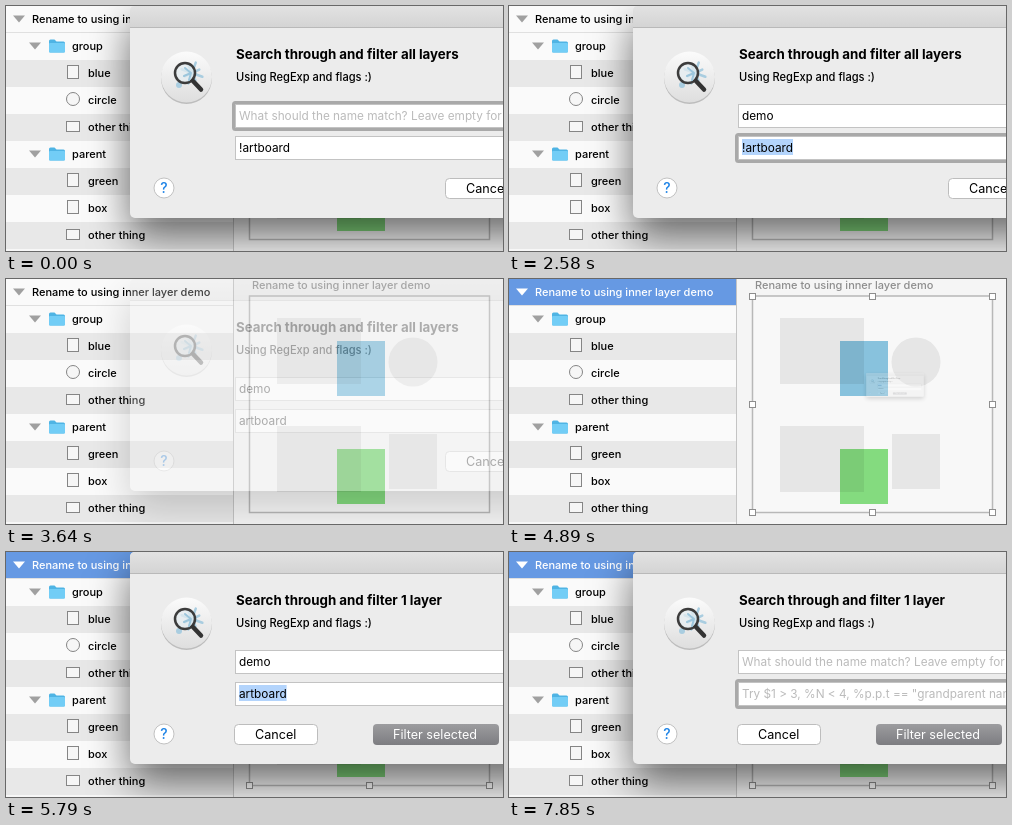
An HTML page for the animation above (8000 ms loop, 497x245 px).

```html
<!DOCTYPE html>
<html lang="en">
<head>
<meta charset="utf-8">
<title>Filter layers dialog</title>
<style>
  html, body { margin: 0; width: 100%; height: 100%; overflow: hidden; background: #f7f7f7; }
  svg { display: block; width: 497px; height: 245px; }
  text { font: 450 11px Inter, "Open Sans", sans-serif; fill: #000; white-space: pre; }
  .blend { mix-blend-mode: multiply; }
  .title { font-size: 13.3px; font-weight: 700; }
  .sub { font-size: 11.1px; }
  .field { font-size: 11.8px; font-weight: 400; }
  .button { font-size: 12.6px; font-weight: 400; }
  #window { filter: drop-shadow(0 18px 20px rgba(0, 0, 0, .58)); }
</style>
</head>
<body>
<svg id="stage" viewBox="0 0 497 245"></svg>
<script>
const LOOP = 8000;
const NAME = 'Rename to using inner layer demo';
const HINTS = [
  'What should the name match? Leave empty for all',
  'Try $1 > 3, %N < 4, %p.p.t == "grandparent name"'
];
const ROWS = [
  ['board', NAME], ['folder', 'group'], ['page', 'blue'], ['circle', 'circle'], ['wide', 'other thing'],
  ['folder', 'parent'], ['page', 'green'], ['page', 'box'], ['wide', 'other thing']
];

const rect = (x, y, w, h, fill, more = '') =>
  `<rect x="${x}" y="${y}" width="${w}" height="${h}" fill="${fill}" ${more}/>`;
const label = (x, y, str, more = '') => `<text x="${x}" y="${y}" ${more}>${str}</text>`;
const arrow = (x, y, more = '') =>
  `<path d="M${x - 6} ${y - 3.5}h12l-6 7z" fill="#a0a0a0" ${more}/>`;
const outline = 'stroke="#858585"';

const icons = {
  board: () => '',
  folder: y => arrow(29, y) +
    `<path d="M43 ${y - 5}q0-1.500 1.500-1.500h4l2 2h7q1.500 0 1.500 1.500v8q0 1.500-1.500 1.500h-13q-1.500 0-1.500-1.500z" fill="#4fb4e4"/>` +
    rect(43, y - 3, 16, 9.5, '#72cdf6', 'rx="1"'),
  page: y => rect(61.5, y - 7.5, 11, 13, '#f6f6f6', outline),
  circle: y => `<circle cx="67" cy="${y - 1}" r="6.500" fill="#f6f6f6" ${outline}/>`,
  wide: y => rect(60.5, y - 5.5, 13, 10, '#f6f6f6', outline)
};

function layerList() {
  const rows = ROWS.map(([kind, str], i) => {
    const y = 13 + 27 * i;
    const x = { board: 26, folder: 66 }[kind] || 82;
    return rect(0, y - 13, 227, 27, i % 2 ? '#fafafa' : '#e8e8e8', i ? '' : 'id="row"') +
      icons[kind](y) + label(x, y + 4, str, i ? '' : 'id="rowName"');
  });
  return rows.join('') + rect(0, 26, 227, 1, '#e0e0e0') +
    arrow(13, 13, 'id="rowArrow"') + rect(227, 0, 1, 245, '#c4c4c4');
}

function artboard() {
  let handles = '';
  for (const x of [243.5, 363.5, 483.5])
    for (const y of [17.5, 125.5, 233.5])
      if (x !== 363.5 || y !== 125.5)
        handles += rect(x - 3, y - 3, 6, 6, '#fff', 'stroke="#8e8e8e"');
  return rect(228, 0, 269, 245, '#f5f5f5') +
    label(246, 10, NAME, 'style="fill:#8d8d8d"') +
    rect(243.5, 17, 240, 216.5, '#f8f8f8', 'stroke="#b8b8b8" stroke-width="1.500"') +
    rect(271, 39, 84, 66, '#e6e6e6') + rect(271, 147, 84, 66, '#e6e6e6') +
    rect(383, 155, 48, 55, '#e6e6e6') + '<circle cx="407" cy="83" r="24.500" fill="#e6e6e6"/>' +
    rect(331, 62, 48, 55, '#8cc8e4', 'class="blend"') +
    rect(331, 170, 48, 55, '#88e283', 'class="blend"') +
    `<g id="handles">${handles}</g>`;
}

const field = (i, y) =>
  rect(227.5, y - 1.5, 400, 27, 'none', `id="ring${i}" stroke="#a9a9a9" stroke-width="3" rx="2"`) +
  rect(229.5, y + .5, 396, 23, '#fff', 'stroke="#c3c3c3"') +
  rect(233, y + 3, 0, 16, '#b3d4fc', `id="mark${i}"`) +
  label(233, y + 15.5, '', `id="text${i}" class="field"`) +
  rect(233, y + 3, 1, 16, '#111', `id="caret${i}"`);

function magnifier() {
  let splash = '';
  for (let k = 0; k < 8; k++)
    splash += `<path d="M186 67v-${k % 2 ? 8 : 11}" transform="rotate(${k * 45 + 20} 186 67)"/>`;
  return '<circle cx="180.500" cy="72.500" r="25.500" fill="#000" opacity=".2"/>' +
    '<circle cx="180.500" cy="71" r="25.500" fill="url(#disc)"/>' +
    `<g stroke="#a9cde0" stroke-width="2.500" stroke-linecap="round">${splash}</g>` +
    '<circle cx="173" cy="79" r="3" fill="#a9cde0"/>' +
    '<circle cx="179" cy="67" r="10" fill="#e4ecf0" fill-opacity=".75" stroke="#3c3c3c" stroke-width="2.500"/>' +
    '<path d="M185 67l-6-5m6 5l-7 3m7-3l-2 7" stroke="#9cc6dc" stroke-width="2" stroke-linecap="round"/>' +
    '<path d="M187 75l8 8.500" stroke="#333" stroke-width="4.500" stroke-linecap="round"/>';
}

function dialog() {
  return '<g id="dialog">' +
    rect(124, 0, 524, 212, '#ececec', 'rx="5" id="window"') +
    '<path d="M124 21V5q0-5 5-5h514q5 0 5 5v16z" fill="url(#bar)"/>' +
    rect(124, 21, 524, 1, '#b9b9b9') +
    magnifier() +
    label(230, 53, '', 'id="title" class="title"') +
    label(230, 75, 'Using RegExp and flags :)', 'class="sub"') +
    field(0, 98) + field(1, 130) +
    '<circle cx="158" cy="182" r="10" fill="#fff" stroke="#c2c2c2"/>' +
    label(158, 187, '?', 'text-anchor="middle" style="font-size:14px;fill:#1b82e6"') +
    '<g id="buttons">' +
    rect(228.5, 172.5, 83, 20, '#fff', 'rx="4" stroke="#bdbdbd"') +
    label(249, 187, 'Cancel', 'class="button"') +
    rect(367, 172, 126, 21, 'url(#push)', 'rx="4"') +
    label(387, 187, 'Filter selected', 'class="button" style="fill:#fff"') +
    '</g></g>';
}

const gradient = (id, from, to) =>
  `<linearGradient id="${id}" x2="0" y2="1"><stop stop-color="${from}"/><stop offset="1" stop-color="${to}"/></linearGradient>`;

document.getElementById('stage').innerHTML =
  '<defs>' + gradient('bar', '#e2e2e2', '#d4d4d4') + gradient('disc', '#fbfbfb', '#dedede') +
  gradient('push', '#9c9c9f', '#7d7d81') + '</defs>' + artboard() + layerList() + dialog();

const $ = id => document.getElementById(id);
const set = (id, attrs) => { for (const k in attrs) $(id).setAttribute(k, attrs[k]); };
const show = (id, on) => set(id, { visibility: on ? 'visible' : 'hidden' });

// Each step overrides part of the state: ring and mark name a field, caret is [field, characters].
const STEPS = [
  [0, { one: false, texts: ['', '!artboard'], ring: 0, mark: -1, caret: null, alpha: 1, scale: 1 }],
  [360, { caret: [0, 0] }],
  [890, { caret: null }],
  [1070, { texts: ['d', '!artboard'], caret: [0, 1] }],
  [1160, { texts: ['de', '!artboard'], caret: [0, 2] }],
  [1330, { texts: ['dem', '!artboard'], caret: [0, 3] }],
  [1510, { texts: ['demo', '!artboard'], caret: [0, 4] }],
  [2140, { caret: null }],
  [2320, { ring: -1, mark: 1 }],
  [2580, { ring: 1 }],
  [2760, { mark: -1, caret: [1, 0] }],
  [2930, { caret: [1, 1] }],
  [3100, { texts: ['demo', 'artboard'], caret: [1, 0] }],
  [3460, { ring: -1, caret: null }],
  [3550, { alpha: .7 }],
  [3640, { alpha: .3 }],
  [3730, { alpha: 0, one: true }],
  [4890, { alpha: .25, scale: .11, ring: 0, mark: 0 }],
  [4980, { alpha: .5, scale: .5 }],
  [5070, { alpha: .7, scale: .88 }],
  [5160, { alpha: .86, scale: 1.041 }],
  [5250, { alpha: 1, scale: 1 }],
  [5790, { ring: -1, mark: 1 }],
  [5960, { ring: 1 }],
  [6320, { ring: -1, mark: 0 }],
  [6590, { texts: ['', 'artboard'], ring: 0, mark: -1, caret: [0, 0] }],
  [6860, { ring: -1, mark: 1, caret: null }],
  [7130, { ring: 1 }],
  [7310, { texts: ['', ''], mark: -1, caret: [1, 0] }],
  [7850, { caret: null }]
];

function draw(t) {
  const s = Object.assign({}, ...STEPS.filter(([at]) => at <= t).map(([, change]) => change));

  set('row', { fill: s.one ? '#6699e3' : '#fafafa' });
  set('rowArrow', { fill: s.one ? '#fff' : '#a0a0a0' });
  $('rowName').style.fill = s.one ? '#fff' : '#000';
  show('handles', s.one);

  set('dialog', {
    opacity: s.alpha,
    transform: `translate(386 106) scale(${s.scale}) translate(-386 -106)`
  });
  $('title').textContent = `Search through and filter ${s.one ? '1 layer' : 'all layers'}`;
  set('buttons', { transform: `translate(${s.one ? 0 : 211} 0)` });

  s.texts.forEach((str, i) => {
    const text = $('text' + i);
    text.textContent = str || HINTS[i];
    text.style.fill = str ? '#000' : '#bbb';
    const width = n => n ? text.getSubStringLength(0, n) : 0;
    const caret = s.caret && s.caret[0] === i;
    show('ring' + i, s.ring === i);
    set('mark' + i, { width: s.mark === i ? width(str.length) : 0 });
    show('caret' + i, caret);
    if (caret) set('caret' + i, { x: 233 + Math.round(width(s.caret[1])) });
  });
}

const start = performance.now();
function tick() {
  draw((performance.now() - start) % LOOP);
  requestAnimationFrame(tick);
}
tick();
</script>
</body>
</html>
```
